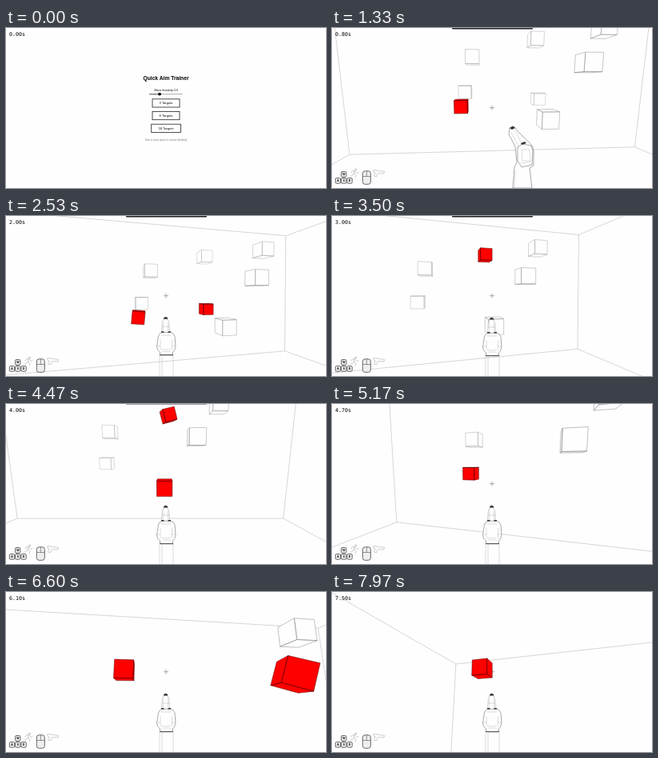
An HTML page that plays this animation: 400 px wide and 200 px high, repeating every 8 s.

```html
<!DOCTYPE html>
<html lang="en">
<head>
<meta charset="utf-8">
<title>Aim trainer</title>
<style>
  html, body { margin: 0; width: 100%; height: 100%; overflow: hidden; background: #fefefe; }
  svg { display: block; width: 400px; height: 200px; }
  text { font-family: "Liberation Sans", Arial, sans-serif; fill: #000; }
  .mid { text-anchor: middle; }
  #clock { font-family: "DejaVu Sans Mono", monospace; font-size: 6.6px; }
  .btn rect { fill: #fff; stroke: #222; stroke-width: .8; }
  .btn text { font-size: 4.1px; }
  .gun { fill: #fefefe; stroke: #555; stroke-width: .5; stroke-linejoin: round; }
  .gun .thin { fill: none; stroke: #aaa; stroke-width: .4; }
  .gun .dark { fill: #333; stroke: none; }
  .key rect { fill: #eee; stroke: #444; stroke-width: .8; }
  .key text { font-size: 3.4px; font-weight: bold; }
  .icon { fill: none; stroke: #aaa; stroke-width: .6; stroke-linecap: round; stroke-linejoin: round; }
  #room { fill: none; stroke: #bbb; stroke-width: .6; }
  #cubes path { stroke-width: .5; stroke-linejoin: round; }
</style>
</head>
<body>
<svg viewBox="0 0 400 200">
  <g id="menu">
    <text class="mid" x="200" y="65.3" font-size="6.7" font-weight="bold">Quick Aim Trainer</text>
    <text class="mid" x="200" y="79" font-size="3">Mouse Sensitivity: 0.8</text>
    <rect x="179" y="81.9" width="42" height="1.4" rx=".7" fill="#bbb"/>
    <rect x="179" y="81.9" width="12" height="1.4" rx=".7" fill="#777"/>
    <circle cx="192" cy="82.6" r="1.9"/>
    <g class="btn">
      <rect x="183" y="88.8" width="34" height="10.2"/><text class="mid" x="200" y="95.3">3 Targets</text>
      <rect x="183" y="104.5" width="34" height="10.2"/><text class="mid" x="200" y="111">8 Targets</text>
      <rect x="181.7" y="120.2" width="36.8" height="10.2"/><text class="mid" x="200" y="126.7">50 Targets</text>
    </g>
    <text class="mid" x="200" y="141.2" font-size="2.9" style="fill:#777">Click or press space to resume (desktop)</text>
  </g>

  <g id="game">
    <path id="room"/>
    <path d="M197 99.7H203M200 96.7V102.7" stroke="#777" stroke-width=".6"/>
    <g id="cubes"></g>
    <rect id="bar" x="150" y="-3" width="101" height="4.6" rx="1" fill="#222428"/>

    <g id="hip" class="gun">
      <path d="M222 125L228 123.500L234 131L247 143.500Q252 148 252 155V172L247 175L250 200H226L228 174L231 168L229 148L221 133Z"/>
      <path class="thin" d="M228 127L238 146M224 131L234 149M236 150V168M247 152V167M229 178L228 200"/>
      <path d="M232 149L238 145L249 147L251 153L250 171L237 174L232 166Z"/>
      <path class="thin" d="M237 152H247L248 166H238ZM235 169L249 167"/>
      <path class="dark" d="M222 125L226 122.500L229 125L225 127ZM236 144L241 142L243 144L237 146Z"/>
    </g>

    <g id="sight" class="gun">
      <path d="M192 175V200M209 175V200M195 175V200" class="thin"/>
      <path d="M190.500 151Q192 147 195 146H206Q209.500 147 211 151L212 164Q211 169 208.500 171V175H192.500V171Q189 169 188.500 164Z"/>
      <path d="M194.500 146L195.300 134L197 130Q199.500 127.500 202 130L203.700 134L204.500 146Z" stroke="#999"/>
      <path class="thin" d="M197 134L196.500 145M202 134L202.500 145M194 150H206M193 155V168M207.500 155V168M195 170H206M189 163H193M207 163H212"/>
      <path class="dark" d="M197 128.500Q199.700 125 202.300 128.500V129.500H197ZM194 145H197L198 146.500H202L203 145H206V146.500H194ZM192 174H209V174.800H192Z"/>
      <path d="M195 139H204M194 167Q200 169 206 167" class="thin"/>
    </g>

    <g class="key">
      <rect x="11.600" y="179.500" width="6.300" height="6.700" rx="1.300"/><text class="mid" x="14.800" y="184">W</text>
      <rect x="4.300" y="187.500" width="6.300" height="6.700" rx="1.300"/><text class="mid" x="7.500" y="192">A</text>
      <rect x="11.600" y="187.500" width="6.300" height="6.700" rx="1.300"/><text class="mid" x="14.800" y="192">S</text>
      <rect x="18.900" y="187.500" width="6.300" height="6.700" rx="1.300"/><text class="mid" x="22.100" y="192">D</text>
    </g>
    <path class="icon" d="M28.500 178.500L27 182L30 184L29.500 187M27 182L25 185H23M28.500 179L25.500 178.500L24 181M28.500 179L31 181.500L33 180.500"/>
    <circle class="icon" cx="29.500" cy="177" r="1"/>
    <rect x="38.300" y="178.800" width="10" height="16.500" rx="3" fill="#eee" stroke="#444" stroke-width=".8"/>
    <path d="M38.300 185.500H48.300M43.300 179V185.500" stroke="#555" stroke-width=".6"/>
    <path class="icon" d="M52.500 177.500L65.500 179.500L65 182L58.500 181.500L57 182L55.500 186L52.500 185L54 181L52 180Z"/>
  </g>
  <text id="clock" x="4" y="10">0.00s</text>
</svg>

<script>
const LOOP = 8000, START = 400, LIFE = 350;
const FOCAL = 227, EDGE = 3.1, HALF_W = 50, HALF_H = 23.8, BACK = -130;
const RAD = Math.PI / 180;
const $ = id => document.getElementById(id);
const clamp = (v, a = 0, b = 1) => Math.min(b, Math.max(a, v));
const ease = u => u * u * (3 - 2 * u);
const lerp = (a, b, u) => a + (b - a) * u;

// Walk of the player; z is the distance to the back wall, angles in degrees.
const walk = [
  { t: 400, x: 0, z: 62, yaw: 0, pitch: 0 },
  { t: 1330, x: -7, z: 60.4, yaw: 4, pitch: -8.2 },
  { t: 2530, x: -14.9, z: 62, yaw: 13, pitch: -.75 },
  { t: 4470, x: 5.9, z: 65.3, yaw: 0, pitch: -9.3 },
  { t: 5930, x: 10.9, z: 50, yaw: -1.3, pitch: 5.6 },
  { t: 6600, x: -5.4, z: 48.2, yaw: 7.4, pitch: 9.85 },
  { t: 7970, x: -15.6, z: 38.6, yaw: 71.3, pitch: 15.2 }
];

// Targets in the order they are hit; spin in degrees per second.
const targets = [
  { x: -11.4, y: -5.9, z: 16, hit: 2480, spin: 100 },
  { x: 9, y: -4.6, z: 11.8, hit: 3100, spin: -190 },
  { x: 6.5, y: 9.9, z: 16, hit: 4400, spin: -220 },
  { x: 5.6, y: -6.8, z: 28.1, hit: 4520, spin: 190 },
  { x: -10.5, y: -2.5, z: 14.4, hit: 5700, spin: -190 },
  { x: 11.7, y: 3.2, z: 29.7, hit: 6480, spin: 150 },
  { x: -8.5, y: 5.6, z: 16.8, hit: 7050, spin: -190 },
  { x: 16.8, y: 10.1, z: 25.6, hit: LOOP + LIFE, spin: 0 }
];

function between(keys, t, curve, names) {
  let i = 0;
  while (i < keys.length - 2 && t >= keys[i + 1].t) i++;
  const a = keys[i], b = keys[i + 1];
  const u = curve(clamp((t - a.t) / (b.t - a.t)));
  return Object.fromEntries(names.map(n => [n, lerp(a[n], b[n], u)]));
}
const place = t => between(walk, t, u => u, ["x", "z"]);

// The view points straight at each target at the moment of its hit.
const aims = targets.filter(g => g.hit < LOOP).map(g => {
  const p = place(g.hit), dx = g.x - p.x, dz = p.z - g.z;
  return { t: g.hit, yaw: Math.atan2(dx, dz) / RAD, pitch: Math.atan2(g.y, Math.hypot(dx, dz)) / RAD };
});
const looks = [...walk, ...aims].sort((a, b) => a.t - b.t);

targets.forEach((g, i) => {
  g.lit = i ? targets[i - 1].hit : 0;
  g.el = document.createElementNS("http://www.w3.org/2000/svg", "path");
  $("cubes").append(g.el);
});

function camera(t) {
  const p = place(t), look = between(looks, t, ease, ["yaw", "pitch"]);
  const [sy, cy] = [Math.sin(look.yaw * RAD), Math.cos(look.yaw * RAD)];
  const [sp, cp] = [Math.sin(look.pitch * RAD), Math.cos(look.pitch * RAD)];
  return ([x, y, z]) => {
    const dx = x - p.x, dz = z + p.z;
    const far = dz * cy + dx * sy;
    return [dx * cy - dz * sy, y * cp - far * sp, far * cp + y * sp];
  };
}

const screen = ([x, y, z]) =>
  (200 + FOCAL * x / z).toFixed(2) + " " + (100 - FOCAL * y / z).toFixed(2);

function edge(a, b) {
  if (a[2] < 1 && b[2] < 1) return "";
  const cut = (p, q) => p[2] >= 1 ? p : p.map((v, i) => lerp(v, q[i], (1 - p[2]) / (q[2] - p[2])));
  return "M" + screen(cut(a, b)) + "L" + screen(cut(b, a));
}

const ring = [[-1, -1], [1, -1], [1, 1], [-1, 1]];

function drawRoom(view) {
  const at = (i, z) => view([ring[i % 4][0] * HALF_W, ring[i % 4][1] * HALF_H, z]);
  $("room").setAttribute("d", ring.map((_, i) =>
    edge(at(i, 0), at(i + 1, 0)) + edge(at(i, 0), at(i, BACK))).join(""));
}

function tumble([x, y, z], a) {
  const s = Math.sin(a), c = Math.cos(a);
  const [rx, ry] = [x * c + y * s, y * c - x * s];
  return [rx * c + z * s, ry, z * c - rx * s];
}

function cubePath(g, view, turn) {
  const point = p => {
    const [x, y, z] = tumble(p.map(v => v * EDGE / 2), turn);
    return view([g.x + x, g.y + y, z - g.z]);
  };
  const mid = point([0, 0, 0]);
  let d = "";
  for (let axis = 0; axis < 3; axis++) for (const side of [-1, 1]) {
    const corner = (u, v) => {
      const p = [0, 0, 0];
      p[axis] = side; p[(axis + 1) % 3] = u; p[(axis + 2) % 3] = v;
      return point(p);
    };
    const face = corner(0, 0);
    const facing = face.reduce((sum, v, i) => sum + v * (v - mid[i]), 0);
    if (facing < 0) {
      const pts = ring.map(([u, v]) => corner(u, v));
      if (side < 0) pts.reverse();
      d += "M" + pts.map(screen).join("L") + "Z";
    }
  }
  return d;
}

function drawCube(g, view, t) {
  const since = t - g.hit, depth = view([g.x, g.y, -g.z])[2];
  const shown = since < LIFE && depth > EDGE;
  g.el.style.display = shown ? "" : "none";
  if (!shown) return;
  const red = t >= g.lit, grey = Math.round(70 + depth * 2.3);
  g.el.setAttribute("d", cubePath(g, view, Math.max(0, since) / 1000 * g.spin * RAD));
  g.el.setAttribute("fill", red ? "#f00" : "#fefefe");
  g.el.setAttribute("stroke", red ? "#500" : `rgb(${grey},${grey},${grey})`);
  g.depth = depth;
}

function draw(t) {
  const playing = t >= START;
  $("menu").style.display = playing ? "none" : "";
  $("game").style.display = playing ? "" : "none";
  const tenths = Math.max(0, Math.round((t - 500) / 100));
  $("clock").textContent = (tenths / 10).toFixed(2) + "s";
  if (!playing) return;

  const view = camera(t);
  drawRoom(view);
  targets.forEach(g => drawCube(g, view, t));
  [...targets].sort((a, b) => b.depth - a.depth).forEach(g => $("cubes").append(g.el));

  const kick = Math.max(0, ...targets.map(g => t < g.hit ? 0 : 1 - (t - g.hit) / 60));
  const raise = ease(clamp((t - 1600) / 200));
  $("hip").style.display = raise < 1 ? "" : "none";
  $("sight").style.display = raise < 1 ? "none" : "";
  $("hip").setAttribute("transform", `translate(${-36 * raise} ${4 * raise})`);
  $("sight").setAttribute("transform", `translate(0 ${-5 * kick})`);

  const gone = clamp((t - 4300) / 300);
  $("bar").setAttribute("transform", `translate(0 ${-1.2 * gone})`);
  $("bar").setAttribute("opacity", 1 - gone);
}

const t0 = performance.now();
function tick() {
  draw((performance.now() - t0) % LOOP);
  requestAnimationFrame(tick);
}
tick();
</script>
</body>
</html>
```
